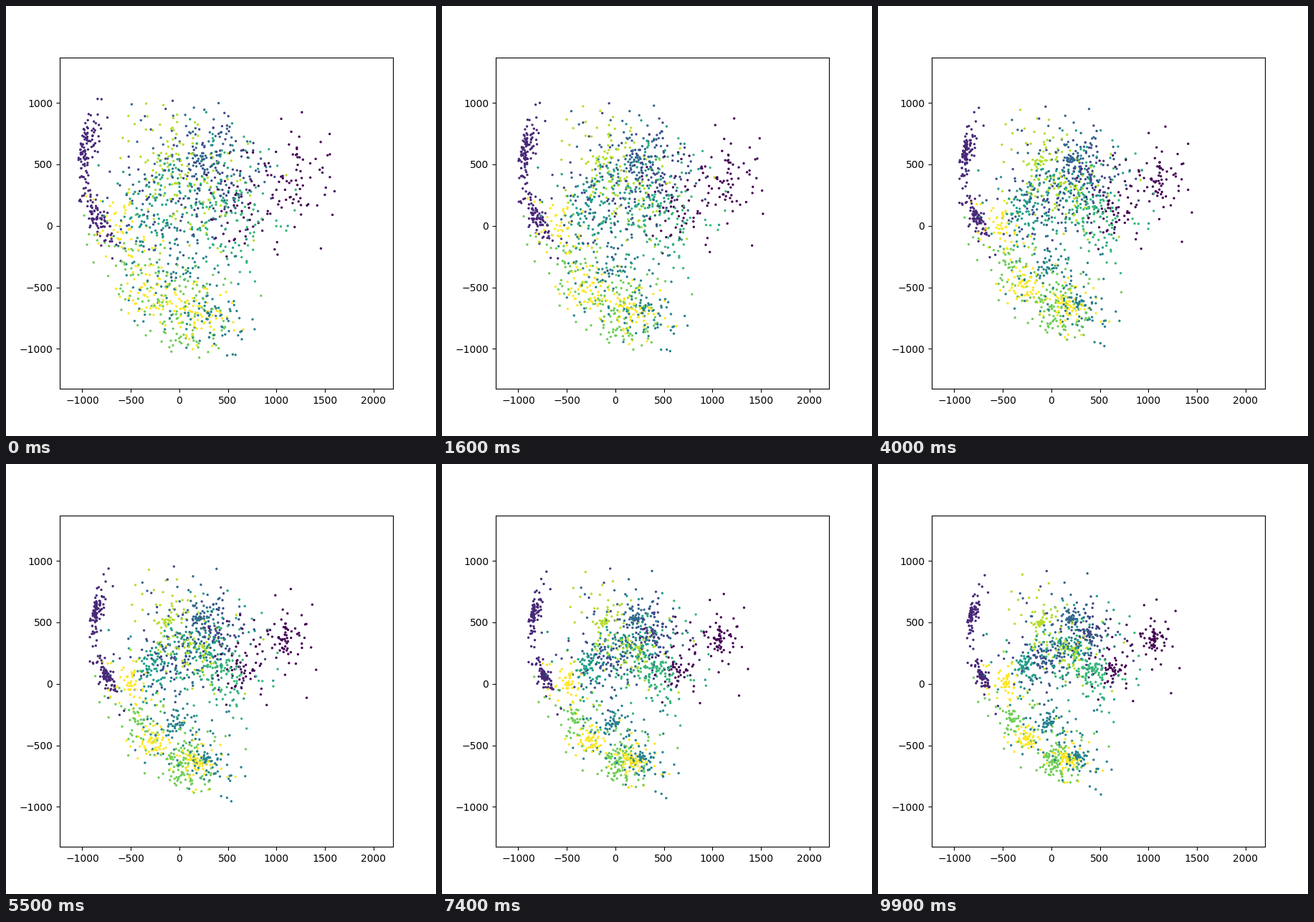
Animation, 600 px wide and 600 px high, one loop 10000 ms. Source, as a matplotlib script:

```python
import numpy as np
import matplotlib.pyplot as plt
from matplotlib.animation import FuncAnimation

FRAMES = 100
INTERVAL = 100
CLOUD_SIZE = 75
REACH = 2.4                       # radius of a cloud, in standard deviations
CORE = 0.25                       # how far the middle of a cloud shrinks
FOCUS, PULL = np.array([60, 60]), 0.86
RIM_CENTRE, RIM = np.array([300, 300]), 1380

rng = np.random.default_rng(7)
starts, ends, rates, labels = [], [], [], []


def inside_rim(p):
    """Keep the left and lower edge of the data round."""
    d = p - RIM_CENTRE
    dist = np.hypot(*d.T)
    far = (dist > RIM) & (p[:, 0] < 900)
    limit = RIM * rng.uniform(0.86, 1, len(p))
    scale = np.where(far, limit / dist, 1)
    return RIM_CENTRE + d * scale[:, None]


def cloud(label, x, y, spread, aspect=1.2, slope=0.0, n=CLOUD_SIZE):
    """Points that gather round a drifting centre, the middle ones most."""
    z = rng.normal(size=(n, 2))
    r = np.minimum(np.hypot(*z.T), REACH)
    z *= (r / np.hypot(*z.T))[:, None]
    z *= np.where(rng.random(n) < 0.06, 1.4, 1)[:, None]

    centre = np.array([x, y])
    off = z * (spread * aspect, spread)
    off[:, 1] += slope * off[:, 0]
    start = inside_rim(centre + off)

    loose = (r / REACH) ** 2 * rng.uniform(0.55, 0.95, n)
    shrink = CORE + (1 - CORE) * loose
    goal = FOCUS + PULL * (centre - FOCUS)
    starts.append(start)
    ends.append(goal + (start - centre) * shrink[:, None])
    rates.append(2.2 - 1.6 * r / REACH)
    labels.append(np.full(n, label))


cloud(0, 1220, 430, 220)
cloud(0, 760, 130, 210, n=55)
cloud(1, -970, 650, 150, aspect=0.3, n=95)
cloud(1, -840, 60, 75, aspect=1.4, slope=-1.2, n=85)
cloud(2, 460, 480, 200)
cloud(2, -120, 250, 320)
cloud(3, 220, 620, 170, n=60)
cloud(3, 50, 270, 290)
cloud(4, -40, -380, 250)
cloud(4, 290, -690, 180)
cloud(5, -330, 170, 160)
cloud(5, 230, 320, 240)
cloud(6, 480, 120, 260, n=125)
cloud(7, 30, -740, 210, n=105)
cloud(7, -480, -350, 190, slope=-0.5, n=55)
cloud(8, -140, 570, 190, n=60)
cloud(8, 260, 300, 270, n=70)
cloud(9, 190, -720, 120, aspect=1.8)
cloud(9, -300, -520, 140, n=60)
cloud(9, -530, 0, 150, n=50)

start, end, rate, label = map(np.concatenate, (starts, ends, rates, labels))
order = rng.permutation(len(label))
start, end, rate, label = (a[order] for a in (start, end, rate, label))


def positions(frame):
    u = frame / (FRAMES - 1)
    ease = (1 - np.exp(-rate * u)) / (1 - np.exp(-rate))
    return start + (end - start) * ease[:, None]


fig, ax = plt.subplots(figsize=(6, 6), dpi=100)
dots = ax.scatter(*start.T, c=label, s=2, cmap="viridis")
ax.set_xlim(-1232.5, 2202.5)
ax.set_ylim(-1324, 1368)


def update(frame):
    dots.set_offsets(positions(frame))
    return (dots,)


anim = FuncAnimation(fig, update, frames=FRAMES, interval=INTERVAL,
                     init_func=lambda: update(0), repeat=True, repeat_delay=0)
plt.show()
```
